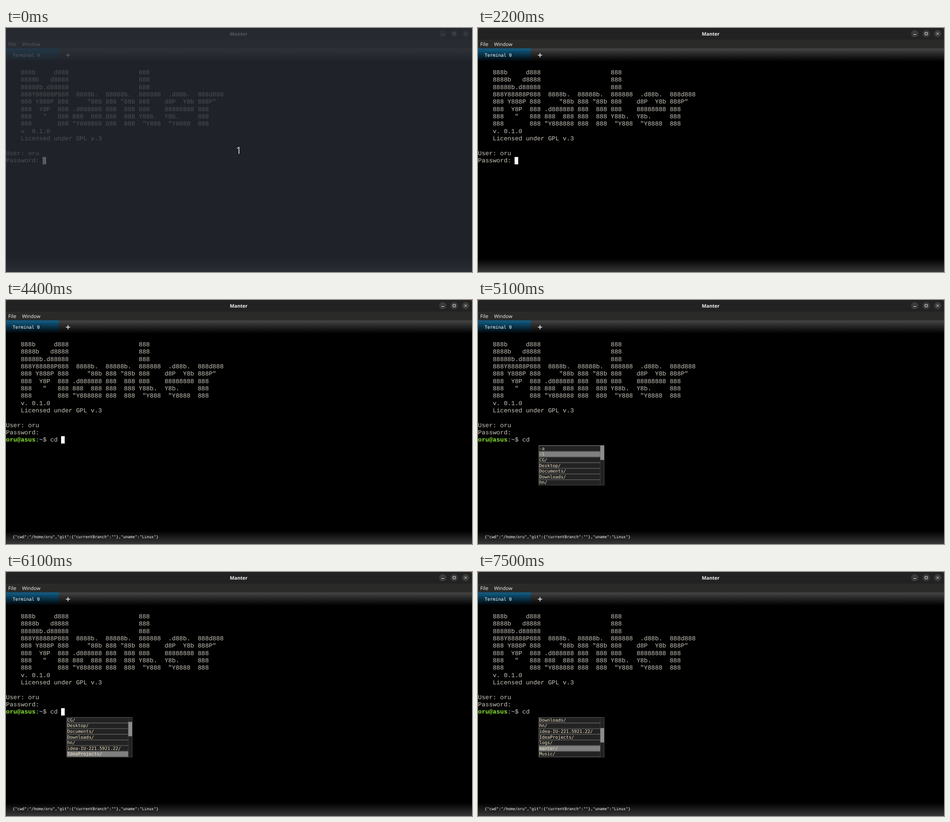
An HTML page for the animation above (8000 ms loop, 1032 px wide and 543 px high).

```html
<!DOCTYPE html>
<html lang="en">
<head>
<meta charset="utf-8">
<title>Manter</title>
<style>
  html, body { margin: 0; width: 100%; height: 100%; overflow: hidden; background: #000; }
  svg { display: block; width: 1032px; height: 543px; }
  text { text-rendering: geometricPrecision; white-space: pre; }
  .ui { font-family: "Open Sans", "Noto Sans", sans-serif; fill: #f4f4f4; }
  .term { font: 13.61px "Liberation Mono", monospace; fill: #cbc6bb; }
  .mono { font-family: "DejaVu Sans Mono", monospace; fill: #fff; }
  .item { font-size: 9.87px; fill: #f1e3c6; }
  .host { font-weight: bold; fill: #8ae234; }
  .path { font-weight: bold; fill: #8fa9c4; }
</style>
</head>
<body>
<svg id="stage" viewBox="0 0 1032 543" xmlns="http://www.w3.org/2000/svg">
  <defs>
    <linearGradient id="bar" x2="0" y2="1"><stop stop-color="#454545"/><stop offset="1" stop-color="#000"/></linearGradient>
    <linearGradient id="tab" x2="0" y2="1"><stop stop-color="#11608a"/><stop offset="1" stop-color="#000"/></linearGradient>
    <linearGradient id="foot" x2="0" y2="1"><stop stop-color="#000"/><stop offset="1" stop-color="#383838"/></linearGradient>
    <clipPath id="view"><rect x="134.5" y="323.8" width="137" height="87.8"/></clipPath>
  </defs>

  <rect width="1032" height="26" fill="#7a2a24"/>
  <path d="M0 26V6Q0 0 6 0H1026Q1032 0 1032 6V26Z" fill="#222"/>
  <rect y="26" width="1032" height="20" fill="#2a2a29"/>
  <text class="ui" x="515.3" y="17" text-anchor="middle" font-size="10.6" font-weight="700">Manter</text>
  <g fill="#3b3b3a">
    <circle cx="967.3" cy="12.6" r="8"/><circle cx="992.6" cy="12.6" r="8"/><circle cx="1017.8" cy="12.6" r="8"/>
  </g>
  <g fill="none" stroke="#f2f2f2">
    <path d="M964.3 14.5h6M990 10h5.2v5.2h-5.2zM1015.2 10l5.2 5.2M1020.4 10l-5.2 5.2"/>
  </g>
  <text class="ui" x="5" y="40" font-size="11.2">File</text>
  <text class="ui" x="35.4" y="40" font-size="10.8">Window</text>

  <rect y="45.5" width="1032" height="29" fill="url(#bar)"/>
  <rect y="45.5" width="117" height="29" fill="url(#tab)"/>
  <text class="mono" x="14.8" y="63.8" font-size="9.95">Terminal 0</text>
  <path d="M132.6 60.6h9.4M137.3 55.9v9.4" stroke="#fff" stroke-width="1.5"/>

  <rect y="74" width="1032" height="469"/>
  <rect y="514" width="1032" height="29" fill="url(#foot)"/>
  <g id="term" class="term"></g>
  <rect id="cursor" width="8" height="16.4" fill="#fff"/>
  <text id="status" class="mono" x="14.5" y="530.4" font-size="8.66">{"cwd":"/home/oru","git":{"currentBranch":""},"uname":"Linux"}</text>

  <g id="menu">
    <rect x="134.5" y="323.5" width="145" height="88.4" fill="#1f1f1f" stroke="#555"/>
    <g clip-path="url(#view)"><g id="list"></g></g>
    <rect x="271" y="324" width="8.3" height="87.5" fill="#222"/>
    <rect id="thumb" x="271" y="324" width="8.3" height="32" fill="#8c8c8c"/>
  </g>

  <g id="veil">
    <rect width="1032" height="543" fill="#282d35" fill-opacity=".78"/>
    <text class="ui" x="515.4" y="279.7" text-anchor="middle" font-size="21.5" style="fill:#dce2e8">1</text>
  </g>
</svg>
<script>
const LOOP = 8000, CELL_W = 8.165, CELL_H = 16.35, TOP = 91.1;
const ROW_H = 12.6, VIEW_H = 87.3, LIST_TOP = 324.2, ITEM_COUNT = 19;

const screen = [
  '    888b     d888                   888',
  '    8888b   d8888                   888',
  '    88888b.d88888                   888',
  '    888Y88888P888  8888b.  88888b.  888888  .d88b.  888d888',
  '    888 Y888P 888     "88b 888 "88b 888    d8P  Y8b 888P"',
  '    888  Y8P  888 .d888888 888  888 888    88888888 888',
  '    888   "   888 888  888 888  888 Y88b.  Y8b.     888',
  '    888       888 "Y888888 888  888  "Y888  "Y8888  888',
  '    v. 0.1.0',
  '    Licensed under GPL v.3',
  '',
  'User: oru',
  'Password:'
];
const items = ['-a', '-l', 'CG/', 'Desktop/', 'Documents/', 'Downloads/', 'hn/',
  'idea-IU-221.5921.22/', 'IdeaProjects/', 'logs/', 'manter/', 'Music/'];

// Tables of [start ms, value]
const cursorSteps = [
  [0, [10, 12]], [400, null], [1000, [10, 12]], [1500, null], [2200, [10, 12]], [2800, null],
  [2900, [0, 13]], [3100, [12, 13]], [3700, null], [4000, [13, 13]], [4200, [14, 13]],
  [4400, [15, 13]], [5000, null], [5600, [15, 13]], [6200, null], [6800, [15, 13]], [7400, null]
];
const typedSteps = [[0, ''], [4000, 'c'], [4200, 'cd']];
const pickSteps = [
  [0, 0], [5100, 1], [5200, 2], [5300, 3], [5500, 4], [5700, 5], [5800, 6], [5900, 7],
  [6100, 8], [6300, 9], [6700, 10], [7000, 11], [7500, 10]
];

const $ = id => document.getElementById(id);
const at = (steps, t) => steps.filter(s => s[0] <= t).pop()[1];
const show = (el, on) => el.setAttribute('visibility', on ? 'visible' : 'hidden');

function add(parent, tag, attrs, content = '') {
  const el = document.createElementNS('http://www.w3.org/2000/svg', tag);
  for (const key in attrs) el.setAttribute(key, attrs[key]);
  el.textContent = content.replace(/ /g, '\u00a0');
  return parent.appendChild(el);
}

const baseline = row => TOP + row * CELL_H + 11.7;
screen.forEach((line, i) => add($('term'), 'text', { x: 0, y: baseline(i) }, line));

const prompt = add($('term'), 'g', {});
[[0, 'oru@asus', 'host'], [8, ':', ''], [9, '~', 'path'], [10, '$', '']].forEach(([col, str, cls]) =>
  add(prompt, 'text', { x: col * CELL_W, y: baseline(13), class: cls }, str));
const typed = add($('term'), 'text', { x: 12 * CELL_W, y: baseline(13) });

const rows = items.map((name, i) => {
  const y = LIST_TOP + i * ROW_H;
  const box = add($('list'), 'rect', { x: 135, y: y + .4, width: 136, height: ROW_H - .8, stroke: '#5c5c5c', 'stroke-width': .9 });
  add($('list'), 'text', { x: 135.7, y: y + 9.6, class: 'mono item' }, name);
  return box;
});

function scrollAt(t) {
  let y = 0;
  for (const [start, pick] of pickSteps) {
    if (start > t) break;
    y = Math.min(Math.max(y, (pick + 1) * ROW_H - VIEW_H), pick * ROW_H);
  }
  return y;
}

function draw(t) {
  const cur = at(cursorSteps, t);
  show($('cursor'), cur);
  if (cur) {
    $('cursor').setAttribute('x', Math.round(cur[0] * CELL_W - .3));
    $('cursor').setAttribute('y', Math.floor(TOP + cur[1] * CELL_H));
  }
  show($('veil'), t < 100);
  show(prompt, t >= 3100);
  show($('status'), t >= 3200);
  show($('menu'), t >= 4500);
  typed.textContent = at(typedSteps, t);

  const pick = at(pickSteps, t), scroll = scrollAt(t);
  rows.forEach((box, i) => box.setAttribute('fill', i === pick ? '#808080' : '#222'));
  $('list').setAttribute('transform', `translate(0 ${-scroll})`);
  $('thumb').setAttribute('y', 324 + scroll * VIEW_H / (ITEM_COUNT * ROW_H));
}

const begin = performance.now();
function tick() {
  draw((performance.now() - begin) % LOOP);
  requestAnimationFrame(tick);
}
tick();
</script>
</body>
</html>
```
